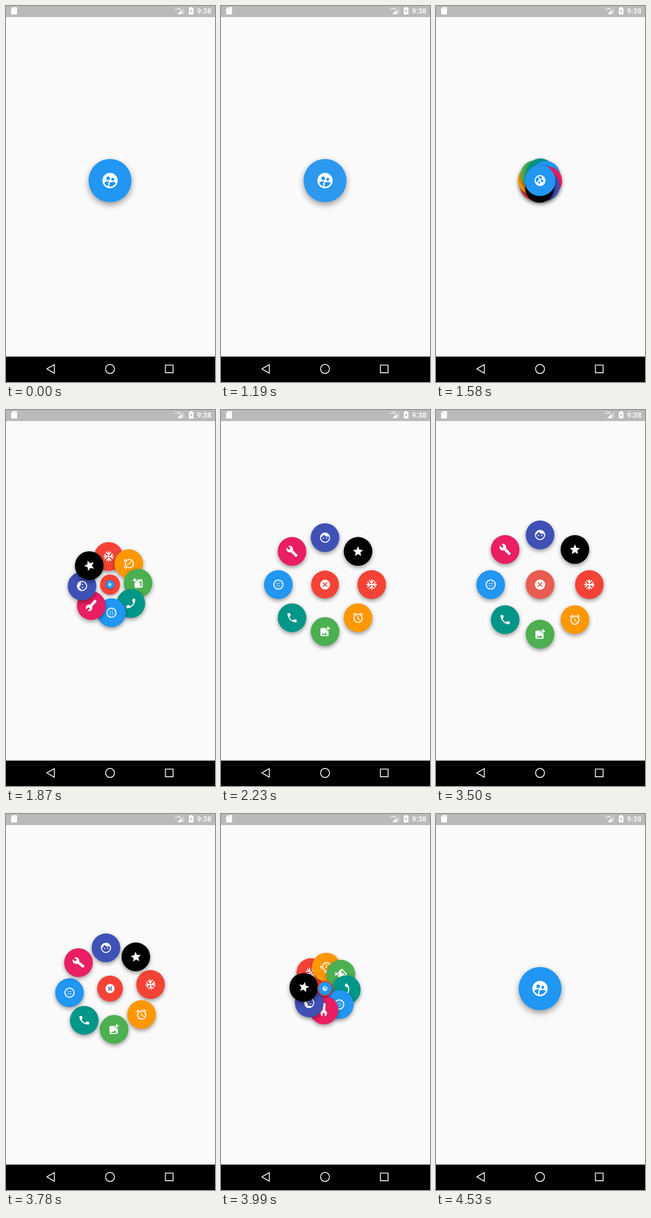
An HTML page with a canvas for the animation above (5.73 s loop, 360 by 644 pixels).

```html
<!DOCTYPE html>
<html lang="en">
<head>
<meta charset="utf-8">
<title>Radial menu</title>
<style>
  html, body { margin: 0; width: 100%; height: 100%; overflow: hidden; background: #fafafa; }
  canvas { display: block; width: 360px; height: 644px; }
</style>
</head>
<body>
<canvas id="stage"></canvas>
<script>
const W = 360, H = 644, LOOP = 5730;
const CX = 179.2, CY = 299;
const RADIUS = 24.65;        // button radius
const UNIT = RADIUS / 28;    // pixels per icon unit
const REACH = 85;            // distance of an open button
const TAU = Math.PI * 2;

const canvas = document.getElementById('stage');
const ctx = canvas.getContext('2d');
const dpr = window.devicePixelRatio || 1;
canvas.width = W * dpr;
canvas.height = H * dpr;

// ---- easing -------------------------------------------------------------
function bezier(x1, y1, x2, y2) {
  const at = (a, b, s) => 3 * (1 - s) * (1 - s) * s * a + 3 * (1 - s) * s * s * b + s * s * s;
  return x => {
    if (x <= 0) return 0;
    if (x >= 1) return 1;
    let lo = 0, hi = 1;
    for (let i = 0; i < 24; i++) {
      const mid = (lo + hi) / 2;
      if (at(x1, x2, mid) < x) lo = mid; else hi = mid;
    }
    return at(y1, y2, lo);
  };
}
const fastOutSlowIn = bezier(0.4, 0, 0.2, 1);
const spread = bezier(0.42, 0, 0.53, 1);

// Linear interpolation through [time, value] pairs.
function track(keys, t) {
  if (t <= keys[0][0]) return keys[0][1];
  for (let i = 1; i < keys.length; i++) {
    const [t0, v0] = keys[i - 1], [t1, v1] = keys[i];
    if (t <= t1) return v0 + (v1 - v0) * (t - t0) / (t1 - t0);
  }
  return keys[keys.length - 1][1];
}

const PROGRESS = [
  [1340, 0], [1740, 0.445], [1870, 0.5185], [2230, 0.82], [2300, 0.835], [2370, 0.835], [2550, 1],
  [3490, 1], [3780, 0.69], [3990, 0.4445], [4350, 0.08], [4500, 0]
];
const OPEN_PRESS = [[1180, 0], [1190, 0.07], [1290, 0.25], [1340, 0.25], [1540, 0]];
const CLOSE_PRESS = [[3180, 0], [3330, 0.24], [3460, 0.24], [3500, 0.2], [3690, 0]];

// ---- icons, drawn on a 24 unit grid --------------------------------------
const DISC = 'M2 12a10 10 0 1 0 20 0a10 10 0 1 0-20 0z';
const dot = (x, y, r) => `M${x - r} ${y}a${r} ${r} 0 1 0 ${2 * r} 0a${r} ${r} 0 1 0${-2 * r} 0z`;

function solid(d) {
  const path = new Path2D(d);
  return () => ctx.fill(path, 'evenodd');
}

function outlined(d, width) {
  const path = new Path2D(d);
  return () => {
    ctx.lineWidth = width;
    ctx.stroke(path);
  };
}

const people = solid(DISC + dot(15.6, 10.27, 1.93) + dot(9.6, 9.12, 2.36) +
  'M9.6 15.9v3.75c-2.4-.75-4.3-2.6-5.14-4.96 1.05-1.12 3.67-1.69 5.14-1.69.53 0 1.2.08 1.9.22-1.64.87-1.9 2.02-1.9 2.68z' +
  'M12 20c-.27 0-.53-.01-.8-.04v-4.07c0-1.42 2.94-2.13 4.4-2.13 1.07 0 2.92.39 3.84 1.15-1.17 2.97-4.06 5.09-7.44 5.09z');

const cancel = solid(DISC +
  'M17 15.59L15.59 17 12 13.41 8.41 17 7 15.59 10.59 12 7 8.41 8.41 7 12 10.59 15.59 7 17 8.41 13.41 12z');

const arm = new Path2D('M0 0V-10M-4.95-8.36L0-3.4L4.95-8.36');
function snow() {
  ctx.lineWidth = 2;
  ctx.save();
  ctx.translate(12, 12);
  for (let i = 0; i < 4; i++) {
    ctx.stroke(arm);
    ctx.rotate(TAU / 4);
  }
  ctx.restore();
}

const clockRing = outlined(dot(12, 13, 8) + 'M2.65 6.47L7.24 2.62M21.35 6.47L16.76 2.62', 2);
const clockHands = outlined('M11.75 8V13.6L16.1 16.2', 1.5);
function alarm() {
  clockRing();
  clockHands();
}

const photo = solid('M19 7v3h-2V7h-3V5h3V2h2v3h3v2z' +
  'M16 11V8h-3V5H5c-1.1 0-2 .9-2 2v12c0 1.1.9 2 2 2h12c1.1 0 2-.9 2-2v-8zM5 19l3-4 2 3 3-4 4 5z');

const phone = solid('M6.62 10.79c1.44 2.83 3.76 5.14 6.59 6.59l2.2-2.2c.27-.27.67-.36 1.02-.24' +
  ' 1.12.37 2.33.57 3.57.57.55 0 1 .45 1 1V20c0 .55-.45 1-1 1-9.39 0-17-7.61-17-17 0-.55.45-1 1-1' +
  'h3.5c.55 0 1 .45 1 1 0 1.25.2 2.45.57 3.57.11.35.03.74-.25 1.02z');

let grain = '';
for (const a of [10, 14]) {
  for (const b of [10, 14]) grain += dot(a, b, 1);
  for (const b of [7, 17]) grain += dot(a, b, 0.6) + dot(b, a, 0.6);
}
const blur = solid(DISC + dot(12, 12, 8) + grain);

const wrench = solid('M22.7 19l-9.1-9.1c.9-2.3.4-5-1.5-6.9-2-2-5-2.4-7.4-1.3L9 6 6 9 1.6 4.7' +
  'C.4 7.1.9 10.1 2.9 12.1c1.9 1.9 4.6 2.4 6.9 1.5l9.1 9.1c.4.4 1 .4 1.4 0l2.3-2.3c.5-.4.5-1.1.1-1.4z');

const face = solid(DISC + 'M12 20c-4.41 0-8-3.59-8-8 0-.29.02-.58.05-.86 2.36-1.05 4.23-2.98 5.21-5.37' +
  'C11.07 8.33 14.05 10 17.42 10c.78 0 1.53-.09 2.25-.26.21.71.33 1.47.33 2.26 0 4.41-3.59 8-8 8z' +
  dot(9, 13, 1.25) + dot(15, 13, 1.25));

const star = solid('M12 17.27L18.18 21l-1.64-7.03L22 9.24l-7.19-.61L12 2 9.19 8.63 2 9.24l5.46 4.73L5.82 21z');

// Clockwise from the right; later buttons lie on top.
const ITEMS = [
  ['#f44336', snow], ['#ff9800', alarm], ['#4caf50', photo], ['#009688', phone],
  ['#2196f3', blur], ['#e91e63', wrench], ['#3f51b5', face], ['#000000', star]
];

// ---- drawing ------------------------------------------------------------
function button(x, y, color, icon, angle, scale = 1, press = 0) {
  const size = Math.abs(scale);
  if (size < 0.004) return;
  ctx.save();
  ctx.translate(x, y);
  ctx.beginPath();
  ctx.arc(0, 0, RADIUS * size, 0, TAU);
  ctx.save();
  ctx.shadowColor = 'rgba(0,0,0,0.4)';
  ctx.shadowBlur = 7 * size * dpr;
  ctx.shadowOffsetY = 3 * size * dpr;
  ctx.fillStyle = color;
  ctx.fill();
  ctx.restore();
  if (press > 0) {
    ctx.fillStyle = `rgba(188,188,188,${press})`;
    ctx.fill();
  }
  ctx.rotate(angle);
  ctx.scale(UNIT * scale, UNIT * scale);
  ctx.translate(-12, -12);
  ctx.fillStyle = ctx.strokeStyle = '#fff';
  icon();
  ctx.restore();
}

function shape(d, color) {
  ctx.fillStyle = color;
  ctx.fill(new Path2D(d), 'evenodd');
}

function label(text, x, y, font) {
  ctx.font = font;
  ctx.fillStyle = '#fff';
  ctx.fillText(text, x, y);
}

function statusBar() {
  ctx.fillStyle = '#bababa';
  ctx.fillRect(0, 0, W, 19);
  shape('M12 2h5.8q1.2 0 1.2 1.2v10q0 1.2-1.2 1.2h-7.8q-1.2 0-1.2-1.2v-8z', '#fff');
  shape('M12 4h1v2.2h-1zM14 4h1v2.2h-1zM16 4h1v2.2h-1z', '#dcdcdc');
  shape('M295 14L307 14V2.5z', 'rgba(255,255,255,0.3)');
  shape('M295 14H302.5V7z', '#fff');
  label('LTE', 291.8, 7.2, '700 5.6px Roboto, sans-serif');
  shape('M317.2 1.8h3.4v1.3h1.4q.9 0 .9.9v9.6q0 .9-.9.9h-6.2q-.9 0-.9-.9V4q0-.9.9-.9h1.4z' +
    'M319.4 5l-2.6 4.3h1.7v3l2.6-4.3h-1.7z', '#fff');
  label('9:38', 329, 13.2, '500 12.6px Roboto, sans-serif');
}

function navBar() {
  ctx.fillStyle = '#000';
  ctx.fillRect(0, 600.5, W, H - 600.5);
  ctx.strokeStyle = '#e4e4e4';
  ctx.lineWidth = 1.7;
  ctx.lineJoin = 'round';
  ctx.stroke(new Path2D('M70.3 621.6L83.3 614.2V629zM274.6 615h13.2v13.2h-13.2z' + dot(179.2, 621.6, 7.7)));
  ctx.lineJoin = 'miter';
}

function menu(time) {
  const t = track(PROGRESS, time);
  const angle = Math.min(1, t / 0.7) * TAU;
  const reach = REACH * spread(t);
  const scale = 1.5 * (1 - fastOutSlowIn(t));
  ITEMS.forEach(([color, icon], i) => {
    const a = angle + i * TAU / 8;
    button(CX + reach * Math.cos(a), CY + reach * Math.sin(a), color, icon, angle);
  });
  button(CX, CY, '#f44336', cancel, angle, scale - 1, track(CLOSE_PRESS, time));
  button(CX, CY, '#2196f3', people, angle, scale, track(OPEN_PRESS, time));
}

function draw(time) {
  ctx.setTransform(dpr, 0, 0, dpr, 0, 0);
  ctx.fillStyle = '#fafafa';
  ctx.fillRect(0, 0, W, H);
  statusBar();
  menu(time);
  navBar();
}

const start = performance.now();
function tick() {
  draw((performance.now() - start) % LOOP);
  requestAnimationFrame(tick);
}
tick();
</script>
</body>
</html>
```
